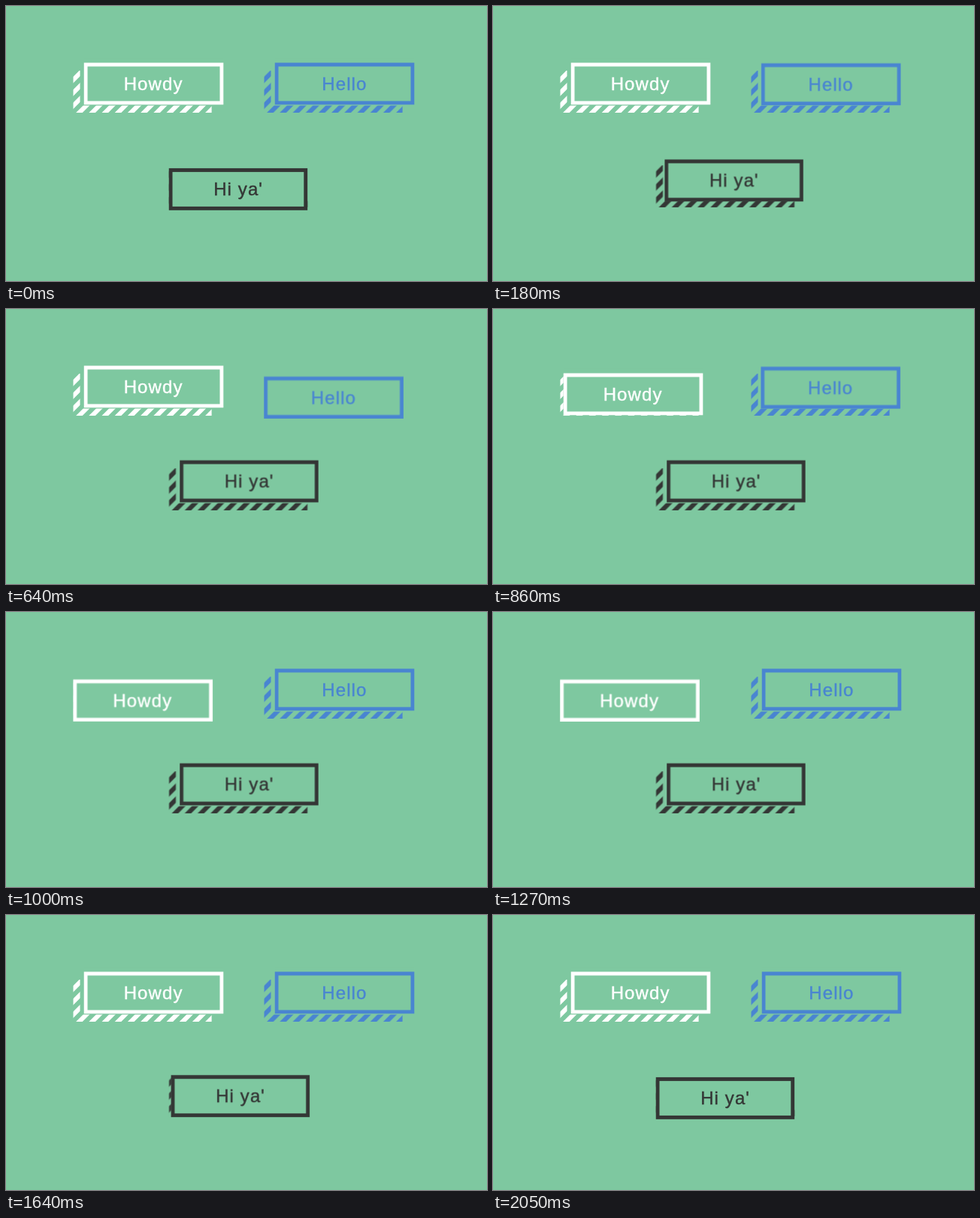
Recreate the animation shown at these times as an HTML page. Size 640x366 px, loop 2.1 s.

```html
<!DOCTYPE html>
<html lang="en">
<head>
<meta charset="utf-8">
<title>Striped buttons</title>
<style>
  html, body { margin: 0; width: 100%; height: 100%; overflow: hidden; background: #7ec8a0; }
  svg { display: block; width: 640px; height: 366px; }

  .white { color: #fff; --w: 186px; }
  .blue { color: #4985d1; --w: 186px; }
  .dark { color: #343635; --w: 184.8px; }

  .face { animation: 2100ms ease infinite; transform: translate(14.5px, -14.5px); }
  .white .face { animation-name: press-white; }
  .blue .face { animation-name: press-blue; }
  .dark .face { animation-name: press-dark; }

  .cover { fill: #7ec8a0; width: var(--w); }
  .frame { fill: none; stroke: currentColor; stroke-width: 5; width: calc(var(--w) - 5px); }
  text {
    font: 24px "Liberation Sans", Arial, Helvetica, sans-serif;
    letter-spacing: 1.1px;
    text-anchor: middle;
    fill: currentColor;
    stroke: currentColor;
    stroke-width: .4;
  }

  @keyframes press-white {
    0%, 35.24% { transform: translate(14.5px, -14.5px); }
    49.52%, 64.76% { transform: none; }
    79.05%, 100% { transform: translate(14.5px, -14.5px); }
  }
  @keyframes press-blue {
    0%, 7.62% { transform: translate(14.5px, -14.5px); }
    21.9%, 31.9% { transform: none; }
    46.19%, 100% { transform: translate(14.5px, -14.5px); }
  }
  @keyframes press-dark {
    0%, 1.43% { transform: none; }
    15.71%, 70.95% { transform: translate(14.5px, -14.5px); }
    85.24%, 100% { transform: none; }
  }
</style>
</head>
<body>
<svg viewBox="0 0 640 366">
  <defs>
    <clipPath id="edge"><path d="M.5-4H9.5V42.5H184.6V52H.5Z"/></clipPath>
    <g id="stripes" clip-path="url(#edge)">
      <path d="M4.5 24H244" transform="skewX(-45)" fill="none" stroke="currentColor" stroke-width="56" stroke-dasharray="8.6"/>
    </g>
    <g id="box">
      <!-- the cover reaches above the frame to hide the stripe tops when pressed -->
      <rect class="cover" y="-6" height="62"/>
      <rect class="frame" x="2.5" y="2.5" height="51"/>
    </g>
  </defs>

  <g class="white" transform="translate(89 90)">
    <use href="#stripes"/>
    <g class="face"><use href="#box"/><text x="92.6" y="36">Howdy</text></g>
  </g>
  <g class="blue" transform="translate(343 90)">
    <use href="#stripes"/>
    <g class="face"><use href="#box"/><text x="92.9" y="36">Hello</text></g>
  </g>
  <g class="dark" transform="translate(216.5 215.9)">
    <use href="#stripes"/>
    <g class="face"><use href="#box"/><text x="92.6" y="36">Hi ya'</text></g>
  </g>
</svg>
</body>
</html>
```
